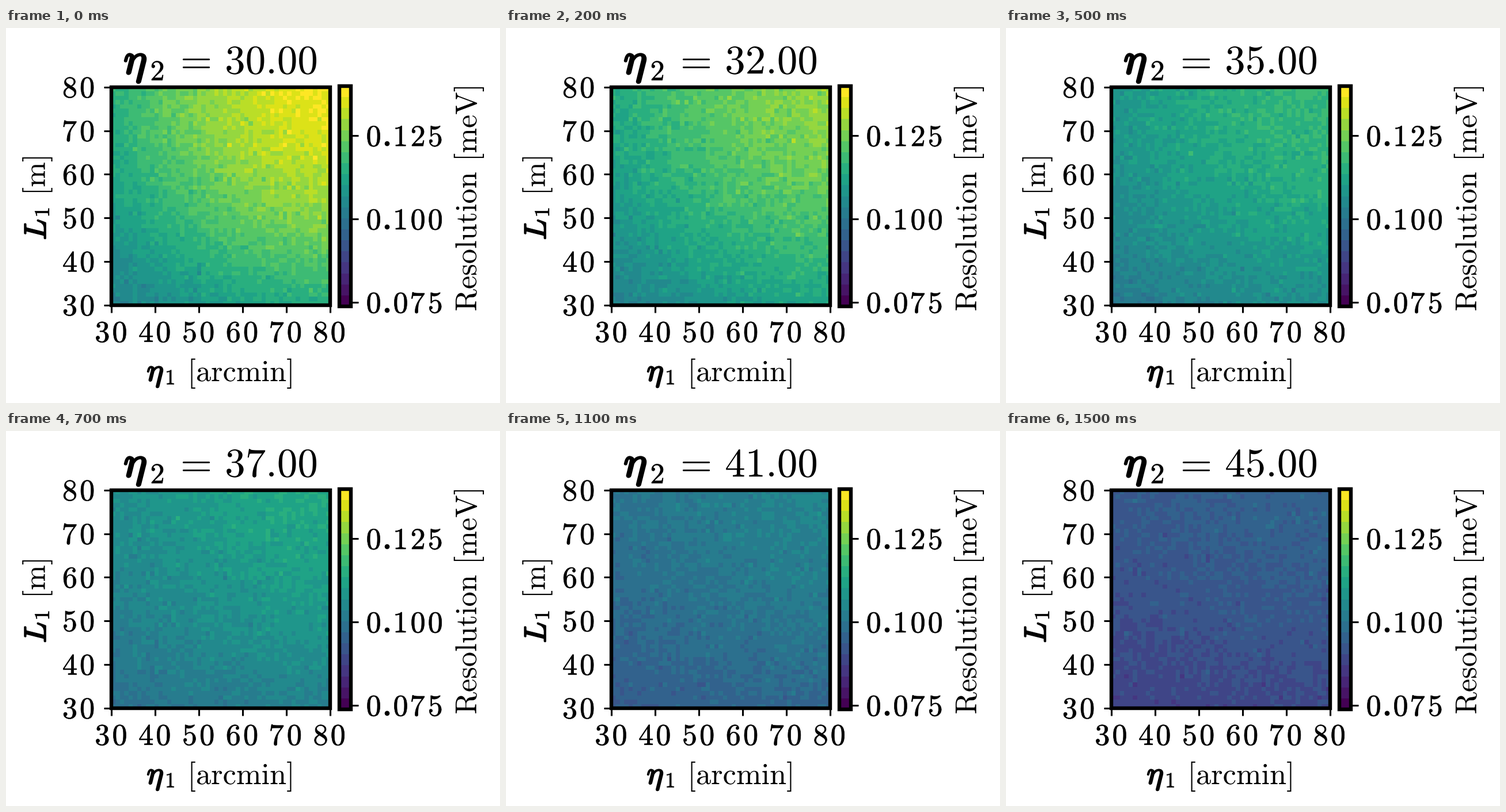
These frames come from a looping animation (858 px wide and 652 px high, 1600 ms). A matplotlib script:

```python
import numpy as np
import matplotlib.pyplot as plt
from matplotlib.animation import FuncAnimation
from matplotlib.patches import Circle, PathPatch, Rectangle
from matplotlib.textpath import TextPath
from matplotlib.transforms import Affine2D

plt.rcParams["mathtext.fontset"] = "cm"

W, H, DPI = 858, 652, 64
PT = 72 / DPI                       # points per pixel
FRAMES, STEP_MS = 16, 100
LEFT, RIGHT, TOP, BOTTOM = 183.4, 562.6, 102.8, 481.7
BAR_LEFT, BAR_RIGHT, BAR_TOP, BAR_BOTTOM = 579.2, 598.9, 101.2, 484.2
LEVELS, CELLS = 20, 51
EM = 52.4                           # label size in pixels
TITLE_EM = 71

fig = plt.figure(figsize=(W / DPI, H / DPI), dpi=DPI, facecolor="white")
ax = fig.add_axes([0, 0, 1, 1])
ax.axis("off")


def math_path(text, size, align=0.5):
    """Outline of a formula, ink aligned on x = 0, baseline on y = 0."""
    path = TextPath((0, 0), f"${text}$", size=size)
    box = path.get_extents()
    shift = -(box.x0 + align * box.width)
    return path.transformed(Affine2D().translate(shift, 0))


def put(text, x, y, size=EM, align=0.5, heavy=0, rot=0):
    place = Affine2D().rotate_deg(rot).scale(1, -1).translate(x, y)
    patch = PathPatch(math_path(text, size, align), facecolor="black",
                      edgecolor="black" if heavy else "none",
                      linewidth=heavy * PT, joinstyle="round",
                      transform=place + ax.transData)
    return ax.add_patch(patch)


def bold_number(text, x, y):
    """Bold digits in equal cells, starting at x and centred on y."""
    base = y + 0.322 * EM
    for char in text:
        cell = (0.319 if char == "." else 0.575) * EM
        mid = x + cell / 2
        if char == ".":
            ax.add_patch(Circle((mid, base - 4.2), 4.3, color="black", lw=0))
        else:
            put(rf"\mathbf{{{char}}}", mid, base, heavy=0.7)
        x += cell


def line(x0, y0, x1, y1):
    ax.plot([x0, x1], [y0, y1], color="black", lw=3.1 * PT,
            solid_capstyle="butt", zorder=2)


def frame_box(x0, y0, x1, y1):
    ax.add_patch(Rectangle((x0, y0), x1 - x0, y1 - y0, fill=False, ec="black",
                           lw=6.4 * PT, joinstyle="miter", zorder=3))


# Level at the four corners of the map, at a few values of eta_2.
ETA2 = [30, 31, 33, 35, 39, 43, 45]
LOW_LOW = [8.2, 8.3, 8.1, 7.7, 6.3, 4.7, 3.8]
HIGH_LOW = [11.8, 11.5, 10.6, 9.3, 7.4, 5.2, 4.2]
LOW_HIGH = [12.0, 11.8, 11.0, 10.0, 8.3, 6.0, 5.2]
HIGH_HIGH = [18.4, 17.0, 14.6, 12.8, 10.0, 7.2, 6.0]

rise = 1 - (1 - np.linspace(0, 1, CELLS)) ** 1.6
U, V = np.meshgrid(rise, rise)


def resolution(eta2):
    a, b, c, d = (np.interp(eta2, ETA2, corner)
                  for corner in (LOW_LOW, HIGH_LOW, LOW_HIGH, HIGH_HIGH))
    level = (a * (1 - U) + b * U) * (1 - V) + (c * (1 - U) + d * U) * V
    noise = np.random.default_rng(eta2).standard_normal(level.shape)
    level += noise * (0.3 + 0.014 * level)
    return np.clip(np.rint(level), 0, LEVELS - 1)


style = dict(cmap=plt.get_cmap("viridis", LEVELS), vmin=-0.5,
             vmax=LEVELS - 0.5, origin="lower", aspect="auto",
             interpolation="nearest", zorder=1)
heat = ax.imshow(resolution(30), extent=(LEFT, RIGHT, BOTTOM, TOP), **style)
ax.imshow(np.arange(LEVELS)[:, None],
          extent=(BAR_LEFT, BAR_RIGHT, BAR_BOTTOM, BAR_TOP), **style)
ax.set_xlim(0, W)
ax.set_ylim(H, 0)
frame_box(LEFT, TOP, RIGHT, BOTTOM)
frame_box(BAR_LEFT, BAR_TOP, BAR_RIGHT, BAR_BOTTOM)

# Ticks and their numbers.
for i in range(6):
    x = LEFT + (RIGHT - LEFT) * i / 5
    y = BOTTOM + (TOP - BOTTOM) * i / 5
    label = str(30 + 10 * i)
    line(x, BOTTOM, x, BOTTOM + 13)
    line(LEFT - 13, y, LEFT, y)
    bold_number(label, x - 1 - 0.575 * EM, 529)
    bold_number(label, 126 - 0.575 * EM, y + 1)
for i, label in enumerate(["0.075", "0.100", "0.125"]):
    y = 477.2 - 144.9 * i
    line(BAR_RIGHT, y, BAR_RIGHT + 13, y)
    bold_number(label, 623.5, y + 1)

# Axis labels.
put(r"\eta", 259, 613.5, size=55, heavy=2.6)
put(r"\mathbf{1}", 285.5, 619.5, size=37, heavy=0.7)
put(r"\mathrm{[arcmin]}", 408.5, 614)
put("L", 69, 350, size=53, heavy=2.4, rot=90)
put(r"\mathbf{1}", 75, 320, size=37, heavy=0.7, rot=90)
put(r"\mathrm{[m]}", 67.5, 255, rot=90)
put(r"\mathrm{Resolution}", 817, 371, rot=90)
put(r"\mathrm{[meV]}", 817, 164.5, rot=90)

# Title.
put(r"\eta", 224.5, 79.5, size=76, heavy=3.8)
put(r"\mathbf{2}", 263, 91, size=50, heavy=0.7)
put("=", 330.5, 79.5, size=TITLE_EM)
value = put("30.00", 539, 79.5, size=TITLE_EM, align=1)


def update(i):
    eta2 = 30 + i
    heat.set_data(resolution(eta2))
    value.set_path(math_path(f"{eta2:.2f}", TITLE_EM, align=1))
    return heat, value


anim = FuncAnimation(fig, update, frames=FRAMES, interval=STEP_MS,
                     repeat=True, repeat_delay=0, blit=False)
plt.show()
```
